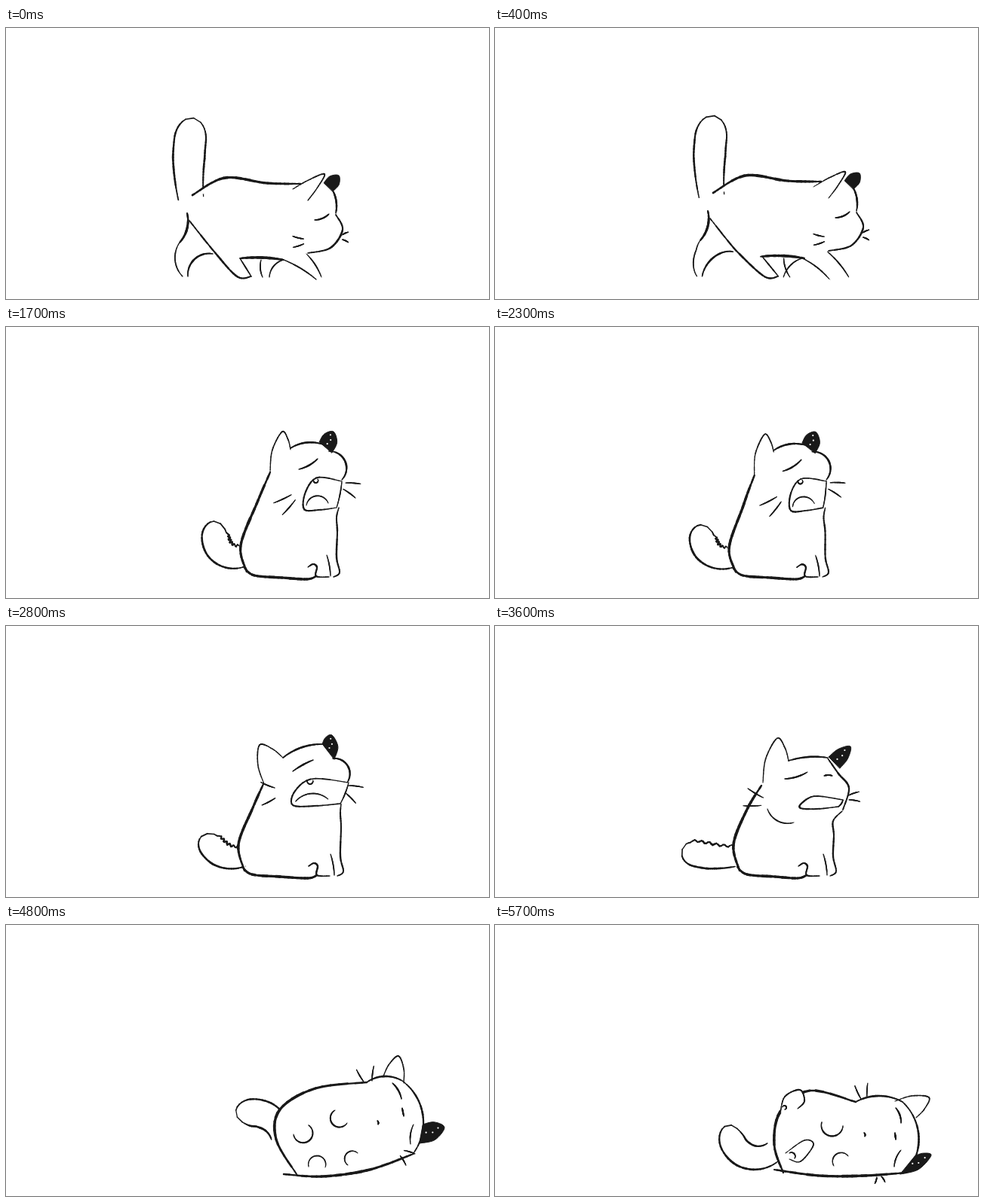
Write an HTML page with a canvas that moves like this. It is 640 by 360 pixels and loops after 5.8 s.

```html
<!DOCTYPE html>
<html lang="en">
<head>
<meta charset="utf-8">
<title>Sleepy cat</title>
<style>
html, body { margin: 0; width: 100%; height: 100%; overflow: hidden; background: #fff; }
canvas { display: block; }
</style>
</head>
<body>
<canvas id="stage" width="640" height="360"></canvas>
<script>
const ctx = document.getElementById('stage').getContext('2d');
const INK = '#191919', LOOP = 5800, STEP = 100, N = 28;
const rad = deg => deg * Math.PI / 180;
const sample = fn => Array.from({ length: N + 1 }, (_, i) => fn(i / N));

// Circular arc between two points; a positive bulge lies left of the direction of travel.
function arc(x, y, X, Y, bulge) {
  const dx = X - x, dy = Y - y, len = Math.hypot(dx, dy);
  const phi = 2 * Math.atan(2 * (bulge || 0.01) / len), r = len / 2 / Math.sin(phi);
  return sample(u => {
    const a = phi * (2 * u - 1);
    const along = 0.5 + r * Math.sin(a) / len, out = r * (Math.cos(a) - Math.cos(phi)) / len;
    return [x + dx * along + dy * out, y + dy * along - dx * out];
  });
}

// Smooth curve through a few points
function line(...xy) {
  const last = xy.length / 2 - 1;
  return sample(v => {
    const u = v * last, i = Math.min(last - 1, Math.floor(u)), t = u - i;
    return [0, 1].map(j => {
      const [a, b, c, d] = [-1, 0, 1, 2].map(k => xy[2 * Math.max(0, Math.min(last, i + k)) + j]);
      return b + 0.5 * t * (c - a + t * (2 * a - 5 * b + 4 * c - d + t * (3 * (b - c) + d - a)));
    });
  });
}

// Rounded ear: base, tip, base
function ear(ax, ay, tx, ty, bx, by, fat = 0.1) {
  return line(ax, ay, (ax + tx) / 2 + (ty - ay) * fat, (ay + ty) / 2 - (tx - ax) * fat,
    tx, ty, (bx + tx) / 2 + (by - ty) * fat, (by + ty) / 2 - (bx - tx) * fat, bx, by);
}

// Tail from its root: heading, total turn, length and half width
function tail(x, y, heading, curl, len, half, fluff = 0) {
  const mid = [[x, y]], turn = u => rad(heading + curl * u);
  for (let i = 0; i < N; i++) {
    const a = turn((i + 0.5) / N), [px, py] = mid[i];
    mid.push([px + Math.cos(a) * len / N, py + Math.sin(a) * len / N]);
  }
  const edge = (side, fur) => mid.map(([px, py], i) => {
    const u = i / N, a = turn(u) + Math.PI / 2, tip = Math.max(0, (u - 0.72) / 0.28);
    const w = side * (half * (0.8 + 0.2 * Math.min(1, 2 * u)) + fur * Math.sin(40 * u)) *
      Math.sqrt(Math.max(0, 1 - tip * tip));
    return [px + Math.cos(a) * w, py + Math.sin(a) * w];
  });
  return { tailA: edge(1, fluff), tailB: edge(-1, 0) };
}

// Two whiskers spreading from one spot
function fan(name, x, y, deg, len, spread = 32) {
  const hair = sign => {
    const a = rad(deg + sign * spread / 2), c = Math.cos(a) * len, s = Math.sin(a) * len;
    return arc(x + c * 0.8, y + s * 0.8, x + c * 1.8, y + s * 1.8, 0.5);
  };
  return { [name + 1]: hair(-1), [name + 2]: hair(1) };
}

function mouth(x, y, X, Y, w) {
  const h = Y - y;
  const parts = {
    mouth: line(x, y, x - 0.65 * w, y - 5, x - 0.96 * w, y + 0.4 * h,
      x - w, Y + 2, x - 0.6 * w, Y + 3, X, Y),
    lip: arc(x, y, X, Y, 1)
  };
  if (h < 20) return parts;
  parts.tongue = arc(X - 0.8 * w, Y - 3, X - 0.22 * w, Y - 6, h * 0.32);
  parts.tooth = arc(x - 0.74 * w, y - 3, x - 0.64 * w, y - 3, -5);
  return parts;
}

// Body shared by all sitting poses
function seated({ neck: [x, y], sag, hip, foot, chin: [cx, cy], leg }) {
  return {
    back: line(x, y, x + (hip - x) * 0.4 - sag, y + (290 - y) * 0.4, hip, 290, hip + 8, 325),
    low: line(hip + 5, 320, hip + 18, 330, hip + 55, 333, foot - 12, 335, foot, 331),
    paw: line(foot - 11, 319, foot - 4, 315, foot + 1, 319, foot, 331, foot + 17, 332),
    legL: arc(leg - 13, 303, leg - 8, 331, 1),
    chest: line(cx, cy, leg, cy + 13, leg + 1, cy + 32, leg, 306, leg + 4, 326, leg - 4, 332)
  };
}

const walk = {
  ...tail(245, 226, 262, 20, 107, 21),
  back: line(390, 207, 345, 206, 290, 199, 247, 222),
  rump: arc(240, 246, 230, 285, 5),
  low: arc(310, 306, 368, 308, 2),
  leg0: line(243, 256, 275, 296, 306, 330, 325, 330),
  leg1: arc(230, 285, 234, 330, -8),
  leg2: arc(310, 306, 325, 330, 0),
  leg3: arc(274, 300, 241, 330, -11),
  leg4: arc(398, 300, 418, 331, 2),
  leg5: arc(368, 308, 411, 334, 2),
  leg6: arc(338, 308, 340, 331, -2),
  leg7: arc(368, 308, 349, 331, -5),
  ear: ear(380, 214, 422, 194, 400, 229, 0.04),
  dark: ear(421, 206, 441, 196, 433, 217, 0.2),
  head: arc(432, 214, 437, 246, 3),
  face: line(437, 248, 446, 268, 430, 292, 400, 299),
  eye: arc(409, 255, 428, 247, -2),
  ...fan('wL', 406, 283, 178, 15), ...fan('wR', 439, 278, 0, 9, 50)
};

const sit = {
  ...tail(317, 300, 190, 114, 96, 20, 1.5),
  ...seated({ neck: [384, 196], sag: 10, hip: 315, foot: 404, chin: [455, 266], leg: 444 }),
  ear: ear(380, 200, 422, 168, 416, 203, 0.04),
  dark: ear(430, 190, 459, 179, 449, 202, 0.12),
  head: arc(430, 190, 457, 224, 7),
  face: arc(457, 226, 455, 266, 11),
  eye: arc(425, 235, 448, 226, -2),
  ...fan('wL', 447, 253, 159, 20), ...fan('wR', 461, 244, 21, 12, 50)
};

const yawn = {
  ...tail(313, 304, 161, 150, 70, 18, 1.5),
  ...seated({ neck: [350, 193], sag: 1, hip: 311, foot: 411, chin: [441, 240], leg: 438 }),
  ear: ear(350, 192, 366, 139, 377, 163),
  dark: ear(415, 153, 434, 139, 432, 167, 0.2),
  head: arc(377, 161, 420, 156, 5),
  face: arc(428, 165, 445, 203, 14),
  eye: arc(388, 189, 413, 175, -2),
  ...mouth(445, 205, 438, 240, 50),
  ...fan('wL', 397, 214, 143, 26, 24), ...fan('wR', 434, 206, 20, 20)
};

const wide = {
  ...tail(313, 306, 163, 100, 63, 17, 1.5),
  ...seated({ neck: [341, 210], sag: 1, hip: 308, foot: 412, chin: [444, 236], leg: 443 }),
  ear: ear(342, 210, 336, 158, 367, 175),
  dark: ear(419, 157, 432, 145, 435, 177, 0.2),
  head: arc(367, 175, 420, 157, 5),
  face: arc(433, 176, 452, 208, 12),
  eye: arc(380, 193, 407, 178, 1),
  ...mouth(454, 208, 443, 236, 74),
  ...fan('wL', 371, 221, 177, 20, 50), ...fan('wR', 438, 210, 26, 20, 38)
};

const drowsy = {
  ...tail(317, 306, 175, 25, 70, 17, 1.5),
  ...seated({ neck: [353, 212], sag: 4, hip: 316, foot: 413, chin: [460, 246], leg: 448 }),
  ear: ear(355, 208, 374, 149, 389, 179),
  dark: ear(442, 174, 471, 160, 457, 189, 0.12),
  head: arc(389, 179, 441, 175, 3),
  face: line(441, 176, 455, 196, 469, 215, 461, 244),
  eye: arc(384, 203, 414, 194, -2),
  nose: arc(436, 199, 447, 199, 1),
  cheek: arc(361, 243, 396, 261, -8),
  ...mouth(461, 231, 455, 240, 56),
  ...fan('wL', 372, 238, 195, 24), ...fan('wR', 457, 229, -5, 15, 28)
};

const flop = {
  ...tail(366, 283, 262, -114, 78, 18),
  back: line(478, 209, 410, 217, 363, 245, 358, 285, 385, 331),
  low: line(368, 331, 420, 334, 482, 325, 540, 304),
  ear: ear(500, 201, 520, 174, 527, 210),
  dark: ear(552, 265, 581, 269, 548, 290, 0.18),
  head: arc(478, 209, 525, 207, 7),
  face: arc(525, 207, 540, 303, 20),
  eye: arc(512, 210, 524, 231, 2), eyeB: arc(540, 265, 536, 291, -2),
  nose: arc(525, 243, 527, 254, 0), navel: arc(492, 260, 493, 265, 1),
  p1: arc(401, 266, 381, 278, 18), p2: arc(436, 246, 452, 263, -15),
  p3: arc(401, 321, 423, 322, 15), p4: arc(453, 319, 466, 303, 11),
  ...fan('wL', 483, 223, 258, 20, 38), ...fan('wR', 516, 296, 38, 15, 42)
};

const sleep = {
  ...tail(370, 300, 137, 148, 89, 17),
  back: line(478, 235, 417, 220, 378, 248, 370, 292, 382, 329),
  low: line(370, 325, 430, 333, 490, 333, 545, 329),
  ear: ear(530, 234, 575, 229, 558, 256),
  dark: ear(556, 307, 578, 306, 537, 331, 0.15),
  head: arc(478, 235, 540, 235, 8),
  face: arc(540, 235, 545, 329, 19),
  eye: arc(531, 243, 538, 263, 2), eyeB: arc(538, 299, 529, 321, -2),
  nose: arc(530, 276, 531, 285, 0), navel: arc(489, 276, 490, 281, 1),
  p1: line(378, 250, 384, 228, 404, 219, 410, 234, 401, 244),
  p2: arc(433, 262, 461, 267, -16),
  p3: line(385, 303, 410, 286, 422, 292, 405, 314, 390, 311),
  p4: arc(449, 320, 468, 307, 11),
  toe1: arc(381, 242, 384, 245, 4), toe3: arc(390, 303, 397, 310, 4),
  ...fan('wL', 492, 246, 259, 20, 28), ...fan('wR', 508, 328, 82, 9, 50)
};

const width = { back: 3.5, low: 3.4, rump: 3, tailA: 2.4, tailB: 2.6, leg0: 2.4, leg3: 2.4,
  face: 2.4, head: 2.4, chest: 2.2, paw: 2.2, eye: 2.1, mouth: 2.1, p1: 2.1, p2: 2.1, nose: 2 };

const keys = [
  [0, walk],
  [200, stride(walk, 22, 12)],
  [400, stride(walk, 42, -9)],
  [700, vary(sit, 0.15, 0)],
  [900, sit],
  [1100, vary(sit, 0.02, -10)],
  [1300, vary(sit, 0.05, -2)],
  [1700, yawn],
  [2100, vary(yawn, -0.06, 3)],
  [2400, vary(yawn, -0.04, -2)],
  [2800, wide],
  [3100, vary(wide, 0.03, -2)],
  [3600, drowsy],
  [4200, vary(drowsy, 0.19, 6)],
  [4500, vary(drowsy, 0.46, 24)],
  [4800, flop],
  [5100, vary(mix(flop, sleep, 0.4), 0, -17)],
  [5400, vary(sleep, 0, -6)],
  [5700, sleep],
  [LOOP, sleep]
];

function reshape(parts, fn) {
  return Object.fromEntries(Object.entries(parts).map(([name, v]) => [name, fn(v, name)]));
}

// Leans the cat over its front paws and swings the tail tip sideways.
function vary(parts, angle, swing) {
  return reshape(parts, (pts, name) => pts.map(([x, y], i) => {
    const a = angle * Math.max(0, Math.min(1, (335 - y) / 120));
    const dx = x - 440, dy = y - 335, c = Math.cos(a), s = Math.sin(a);
    const shift = name.startsWith('tail') ? swing * i / N : 0;
    return [440 + dx * c - dy * s + shift, 335 + dx * s + dy * c];
  }));
}

function stride(parts, shift, swing) {
  return reshape(parts, (pts, name) => {
    const dir = name.startsWith('leg') ? 2 * (name[3] % 2) - 1 : 0;
    return pts.map(([x, y]) => {
      const foot = Math.max(0, (y - 298) / 34);
      return [x + shift + dir * swing * foot, y - 3 * Math.max(0, 1 - foot)];
    });
  });
}

function mix(a, b, t) {
  const out = {};
  for (const name of new Set([...Object.keys(a), ...Object.keys(b)])) {
    if (a[name] && b[name]) {
      out[name] = a[name].map((p, i) => p.map((v, j) => v + (b[name][i][j] - v) * t));
    } else if (t < 0.5 ? a[name] : b[name]) {
      out[name] = a[name] || b[name];
    }
  }
  return out;
}

function noise(n) {
  const v = Math.sin(n * 12.9898) * 43758.5453;
  return v - Math.floor(v);
}

function fill(pts, color) {
  ctx.beginPath();
  pts.forEach(p => ctx.lineTo(p[0], p[1]));
  ctx.closePath();
  ctx.fillStyle = color;
  ctx.fill();
}

function brush(pts, w, seed) {
  for (let i = 0; i < N; i++) {
    ctx.lineWidth = w * (0.5 + 0.4 * Math.sin(Math.PI * (i + 0.5) / N) + 0.25 * noise(seed + i));
    ctx.beginPath();
    ctx.moveTo(...pts[i]);
    ctx.lineTo(...pts[i + 1]);
    ctx.stroke();
  }
}

// White flecks scattered along the middle of the dark ear
function flecks(pts) {
  ctx.fillStyle = '#fff';
  for (let k = 0; k < 3; k++) {
    const i = 3 + k * 3, m = 0.3 + 0.4 * noise(k + 5), p = pts[i], q = pts[N - i];
    ctx.beginPath();
    ctx.arc(p[0] + (q[0] - p[0]) * m, p[1] + (q[1] - p[1]) * m, 1.1, 0, 7);
    ctx.fill();
  }
}

function draw(time) {
  const tick = Math.floor(time / STEP), now = tick * STEP;
  let k = 0;
  while (k < keys.length - 2 && keys[k + 1][0] <= now) k++;
  const [t0, a] = keys[k], [t1, b] = keys[k + 1];
  const t = (now - t0) / (t1 - t0);
  const cat = mix(a, b, t * t * (3 - 2 * t));

  ctx.fillStyle = '#fff';
  ctx.fillRect(0, 0, 640, 360);
  ctx.strokeStyle = INK;
  ctx.lineCap = ctx.lineJoin = 'round';
  Object.keys(cat).forEach((name, i) => {
    if (name === 'back' || name === 'p1') fill(cat[name], '#fff');
    if (name !== 'dark') brush(cat[name], width[name] || 1.7, tick * 7 + i * 31);
  });
  fill(cat.dark, INK);
  ctx.lineWidth = 1;
  ctx.stroke();
  if (now >= 1500) flecks(cat.dark);
}

const start = performance.now();
function frame(now) {
  draw(Math.max(0, now - start) % LOOP);
  requestAnimationFrame(frame);
}
draw(0);
requestAnimationFrame(frame);
</script>
</body>
</html>
```
